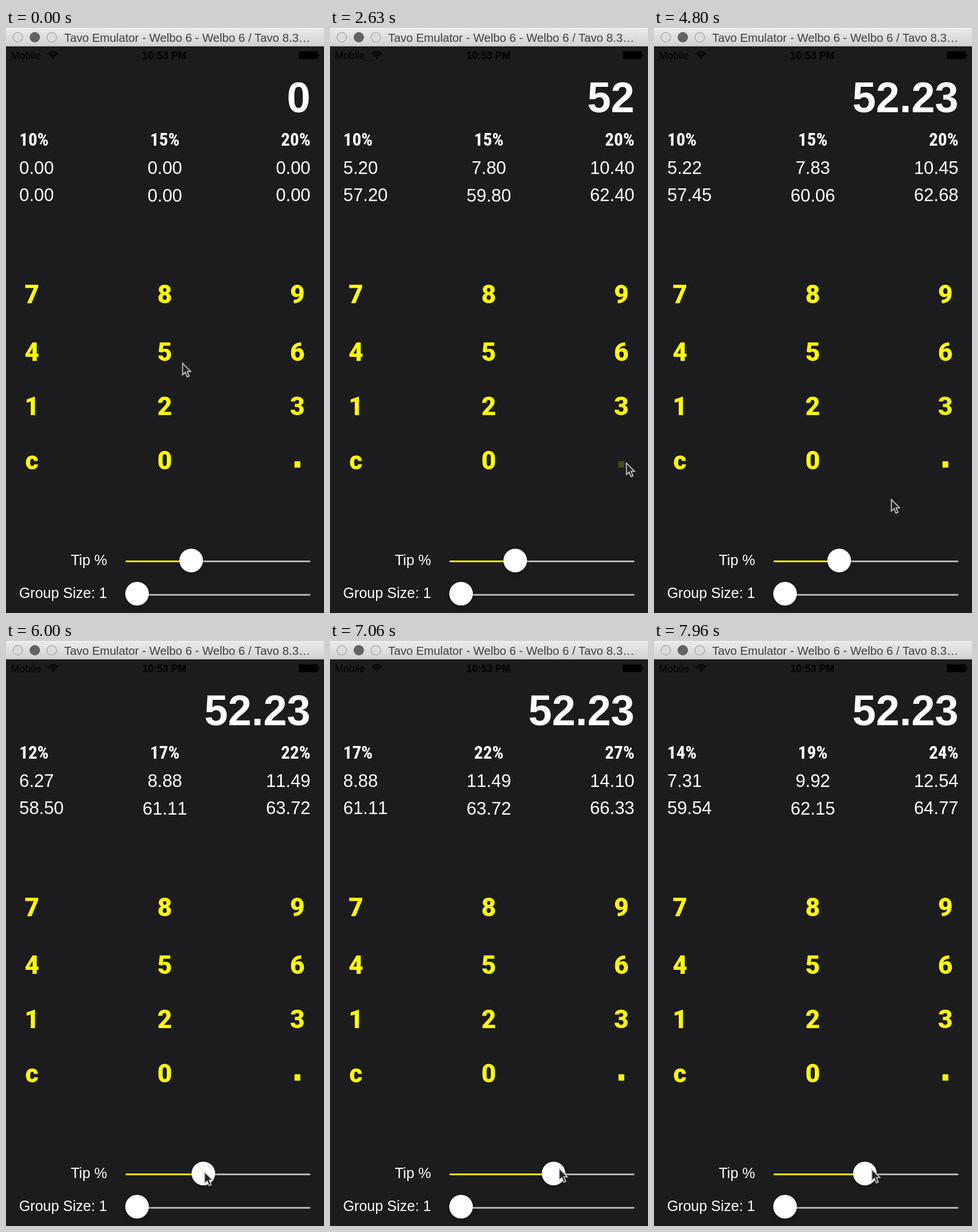
These frames come from a looping animation (552x1014 px, 8000 ms). An HTML page:

```html
<!DOCTYPE html>
<html lang="en">
<head>
<meta charset="utf-8">
<title>Tip calculator</title>
<style>
html, body { margin: 0; width: 100%; height: 100%; overflow: hidden; background: #1c1c1e; }
svg { display: block; width: 100%; height: 100%; }
text { font-family: "Liberation Sans", Arial, sans-serif; fill: #fff; }
.title { font-size: 20.3px; fill: #404040; }
.status { font-size: 17.7px; fill: #000; }
.total { font-size: 73.6px; font-weight: bold; font-kerning: none; }
.pct { font: bold 31px "Roboto Condensed", Roboto, sans-serif; font-stretch: condensed; }
.money { font-size: 30.9px; font-kerning: none; }
.key { font: 900 44px Roboto, sans-serif; fill: #ff0; }
.label { font-size: 25px; }
.end { text-anchor: end; }
.mid { text-anchor: middle; }
.track { fill: #b4b4b4; }
.thumb { fill: #fff; filter: drop-shadow(0 3px 3px rgba(0, 0, 0, .3)); }
</style>
</head>
<body>
<svg viewBox="0 0 552 1014">
  <defs>
    <linearGradient id="bar" x2="0" y2="1">
      <stop stop-color="#ebebeb"/><stop offset="1" stop-color="#d1d1d1"/>
    </linearGradient>
  </defs>
  <rect width="552" height="1014" fill="#1c1c1e"/>

  <rect width="552" height="32" fill="url(#bar)"/>
  <rect width="552" height="1" fill="#f5f5f5"/>
  <rect y="31" width="552" height="1" fill="#a9a9a9"/>
  <g fill="#dcdcdc" stroke="#a4a4a4" stroke-width="1.3">
    <circle cx="20.5" cy="16" r="8.3"/><circle cx="79.5" cy="16" r="8.3"/>
  </g>
  <circle cx="50" cy="16" r="9" fill="#636363"/>
  <text class="title" x="101" y="23.5">Tavo Emulator - Welbo 6 - Welbo 6 / Tavo 8.3…</text>

  <text class="status" x="8.5" y="54">Mobile</text>
  <path d="M73 45.5Q81.5 37.5 90 45.5M76 49Q81.5 43.5 87 49" fill="none" stroke="#000" stroke-width="2.6"/>
  <path d="M79 50.5L81.5 54L84 50.5Q81.5 48.5 79 50.5Z"/>
  <text class="status mid" x="275" y="54" font-weight="bold">10:53 PM</text>
  <rect x="508" y="40.5" width="33" height="13.5" rx="2.5"/>
  <rect x="542" y="45" width="2" height="5" rx="1"/>

  <text class="total end" id="total" x="528.5" y="146"></text>
  <g id="cols"></g>
  <g id="keys"></g>

  <text class="label end" x="175.5" y="930.5">Tip %</text>
  <rect class="track" x="207.5" y="923" width="321" height="3" rx="1.5"/>
  <rect id="fill" x="207.5" y="923" height="3" rx="1.5" fill="#ff0"/>
  <circle id="thumb" class="thumb" cy="923" r="20.5"/>

  <text class="label end" x="175.5" y="988">Group Size: 1</text>
  <rect class="track" x="207.5" y="981" width="321" height="3" rx="1.5"/>
  <circle class="thumb" cx="227.5" cy="980.5" r="20.5"/>

  <path id="cursor" d="M.5 1V21L5.2 16.8L8.5 24.7L12 23.2L8.7 15.4H14.7Z"
    fill="#222" stroke="#ccc" stroke-width="1.7"/>
</svg>
<script>
const LOOP = 8000, FADE = 400;
const KEYS = "789456123c0.";
const $ = id => document.getElementById(id);

// each move: start, end, then the place reached
const pointerMoves = [
  [30, 360, 272, 556],
  [880, 1300, 284, 629],
  [1560, 2260, 514, 753],
  [2850, 3500, 291, 649],
  [3700, 4250, 500, 645],
  [4500, 4900, 390, 858],
  [5060, 5430, 329, 921],
  [5800, 6840, 436, 909],
  [6840, 7640, 265, 928],
  [7640, 8100, 416, 910]
];
const thumbMoves = [[5700, 6840, 420.5], [6840, 7640, 277.5], [7640, 8100, 396.5]];
// key, time down, time up
const presses = [["5", 700, 830], ["2", 1390, 1530], [".", 2630, 2800], ["2", 3550, 3660], ["3", 4300, 4430]];

const clamp = u => Math.min(1, Math.max(0, u));
const ease = u => (u + (1 - Math.cos(Math.PI * u)) / 2) / 2;

const place = (from, moves, t) => moves.reduce((p, [start, end, ...to]) => {
  const u = ease(clamp((t - start) / (end - start)));
  return p.map((v, i) => v + (to[i] - v) * u);
}, from);

const label = (cls, x, y, text = "") => `<text class="${cls}" x="${x}" y="${y}">${text}</text>`;

$("cols").innerHTML = [["", 23, 300], ["mid", 275.7, 301], ["end", 528.5, 300]].map(([side, x, low]) =>
  label("pct " + side, x, 204) + label("money " + side, x, 253) + label("money " + side, x, low)).join("");
const cells = [...$("cols").children];

const rows = [477, 577, 671, 765];
$("keys").innerHTML = [...KEYS].map((k, i) => {
  const x = 45 + 230.4 * (i % 3), y = rows[Math.floor(i / 3)];
  return k === "." ? `<rect x="${x - 5}" y="${y - 14}" width="10" height="11" fill="#ff0"/>` : label("key mid", x, y, k);
}).join("");
const keys = [...$("keys").children];

function keyOpacity(key, t) {
  const press = presses.filter(p => p[0] === key && t >= p[1]).pop();
  return press ? .2 + .8 * clamp((t - press[2]) / FADE) : 1;
}

function draw(now) {
  const t = now % LOOP;
  const total = presses.filter(p => t >= p[2]).map(p => p[0]).join("") || "0";
  const [x] = place([321.5], thumbMoves, t);
  const base = Math.floor((x - 227.5) / 9.38);

  $("total").textContent = total;
  for (let i = 0; i < 3; i++) {
    const pct = base + 5 * i, tip = total * pct / 100;
    [pct + "%", tip.toFixed(2), (+total + tip).toFixed(2)]
      .forEach((s, j) => cells[3 * i + j].textContent = s);
  }
  keys.forEach((k, i) => k.setAttribute("opacity", keyOpacity(KEYS[i], t)));
  $("fill").setAttribute("width", x - 207.5);
  $("thumb").setAttribute("cx", x);
  $("cursor").setAttribute("transform", `translate(${place([306, 580], pointerMoves, t)})`);
  requestAnimationFrame(draw);
}
draw(0);
</script>
</body>
</html>
```
